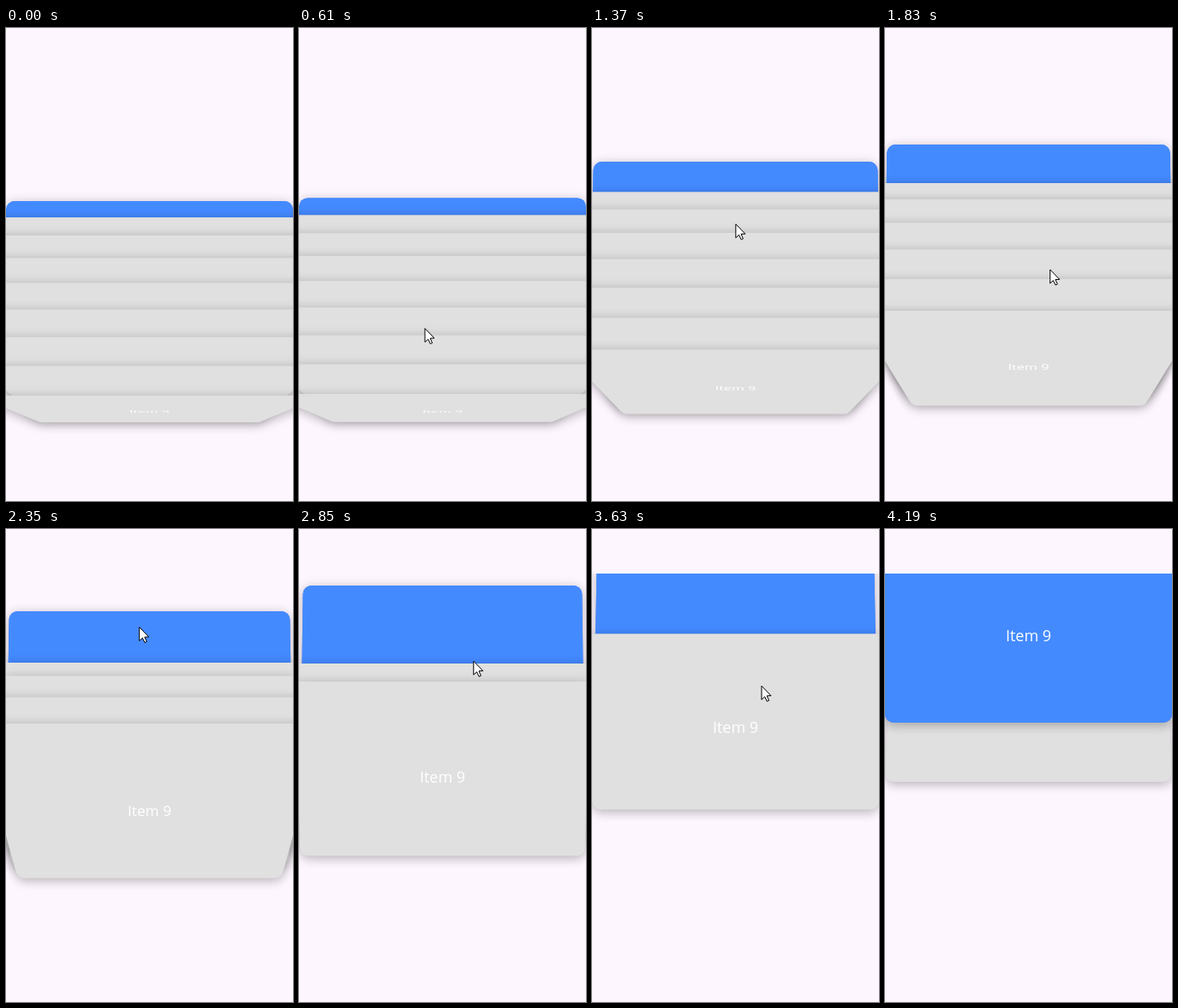
Write an HTML page with a canvas that moves like this. It is 335 by 552 pixels and loops after 5200 ms.

```html
<!DOCTYPE html>
<html lang="en">
<head>
<meta charset="utf-8">
<title>Card stack</title>
<style>
  html, body { margin: 0; height: 100%; overflow: hidden; background: #fdf6fe; }
  canvas { display: block; width: 335px; height: 552px; }
</style>
</head>
<body>
<canvas></canvas>
<script>
const W = 335, H = 552, LOOP = 5200, LIST_TOP = 52, LAST = 9, CARD_H = 205;
const STACK_BOTTOM = 429, STACK_TOP = 21, FLAT_BELOW = 174;
const BACK = '#fdf6fe', BLUE = '#448aff', GREY = '#e0e0e0';
const canvas = document.querySelector('canvas');
const ctx = canvas.getContext('2d');
const dpr = window.devicePixelRatio || 1;
canvas.width = W * dpr;
canvas.height = H * dpr;

// Scroll moves: start and end time, then the top edges they lead to
const MOVES = [
  { from: -1, to: 0, active: 202, first: 221, front: 429 },
  { from: 570, to: 890, active: 174, first: 201, front: 416 },
  { from: 1130, to: 1640, active: 136, first: 181, front: 330 },
  { from: 2130, to: 2350, active: 96, first: 156, front: 227 },
  { from: 2350, to: 2850, active: 66, first: 157, front: 178 },
  { from: 2850, to: 3630, active: 42, first: 123, front: 123 },
  { from: 3630, to: 3870, active: 21, first: 21, front: 21 }];

// Turning points of the pointer: time, x, y
const POINTER = [[230, 81, 427], [330, 148, 384], [570, 148, 384], [900, 144, 119], [1200, 190, 385],
  [1500, 152, 112], [2030, 218, 385], [2350, 156, 114], [2600, 195, 375], [2870, 205, 138],
  [3250, 190, 335], [3630, 198, 184], [3880, 318, 100], [4190, -12, 546]];

const clamp = v => Math.max(0, Math.min(1, v));
const mix = (a, b, f) => a + (b - a) * f;
const smooth = v => v * v * (3 - 2 * v);

const edge = (name, t) =>
  MOVES.reduce((v, m) => mix(v, m[name], clamp((t - m.from) / (m.to - m.from))), 0);

function pointerAt(t) {
  const i = POINTER.findIndex(key => key[0] > t);
  const [t0, x0, y0] = POINTER[i - 1], [t1, x1, y1] = POINTER[i];
  const f = (t - t0) / (t1 - t0);
  return [mix(x0, x1, f), mix(y0, y1, f)];
}

// Symmetric card: left inset x1 at the top, x2 at the bottom
function drawCard(top, bottom, x1, x2, color, rTop, rBottom) {
  const pts = [[x1, top, rTop], [W - x1, top, rTop], [W - x2, bottom, rBottom], [x2, bottom, rBottom]];
  const path = new Path2D();
  path.moveTo(W / 2, top);
  for (let i = 1; i <= 4; i++) {
    const [x, y, r] = pts[i % 4], next = pts[(i + 1) % 4];
    path.arcTo(x, y, next[0], next[1], r);
  }
  path.closePath();
  ctx.fillStyle = color;
  for (const [blur, dy, alpha] of [[14, 1, .14], [12, 4, .16]]) {
    ctx.shadowColor = `rgba(0,0,0,${alpha})`;
    ctx.shadowBlur = blur * dpr;
    ctx.shadowOffsetY = dy * dpr;
    ctx.fill(path);
  }
  ctx.shadowColor = 'transparent';
}

// The lower a card lies in the stack, the further its bottom edge tips away
function tiltedCard(top, color) {
  const angle = 1.37 * clamp((top - FLAT_BELOW) / (STACK_BOTTOM - FLAT_BELOW));
  const far = 1 / (1 + .32 * Math.sin(angle));
  const height = CARD_H * Math.cos(angle) * far;
  const overhang = 36 * Math.min(1, 4 * Math.sin(angle));
  drawCard(top, top + height, -overhang, W / 2 * (1 - far), color, 0, 10);
  return { height, far };
}

function drawCards(t) {
  const active = edge('active', t), first = edge('first', t), front = edge('front', t);
  const progress = (STACK_BOTTOM - front) / (STACK_BOTTOM - STACK_TOP);
  const selected = Math.round(1.4 + (LAST - 1) * smooth(progress));
  const gaps = Math.max(1, LAST - 1 - selected);
  const cardTop = i => mix(first, front, (1 - (LAST - i) / gaps) ** (1.18 + .4 * progress));

  if (selected === LAST) {
    drawCard(active + 70, active + 274, 8, 0, GREY, 10, 9);
  } else {
    const lean = .035 * (MOVES[0].active - active);
    drawCard(active, cardTop(selected + 1) + 12, lean, lean * .7, BLUE, 10, 0);
  }
  for (let i = selected + 1; i < LAST; i++) tiltedCard(cardTop(i), GREY);
  const { height, far } = tiltedCard(front, selected === LAST ? BLUE : GREY);

  ctx.save();
  ctx.translate(W / 2, front + height * (.5 + .0003 * (front - STACK_TOP)));
  ctx.scale((1 + far) / 2, height / CARD_H);
  ctx.font = '500 18px "Open Sans", "Noto Sans", sans-serif';
  ctx.textAlign = 'center';
  ctx.fillStyle = '#fff';
  ctx.fillText('Item 9', 0, 7);
  ctx.restore();
}

function drawPointer(x, y) {
  ctx.save();
  ctx.translate(x - .5, y - .5);
  ctx.beginPath();
  for (const [px, py] of [[0, 0], [0, 16], [3.7, 12.6], [6.3, 18], [8.6, 17], [6.2, 11.6], [11, 11.4]]) ctx.lineTo(px, py);
  ctx.closePath();
  ctx.fillStyle = '#fff';
  ctx.strokeStyle = '#000';
  ctx.fill();
  ctx.stroke();
  ctx.restore();
}

function draw(t) {
  ctx.setTransform(dpr, 0, 0, dpr, 0, 0);
  ctx.fillStyle = BACK;
  ctx.fillRect(0, 0, W, H);
  ctx.save();
  ctx.beginPath();
  ctx.rect(0, LIST_TOP, W, H - LIST_TOP);
  ctx.clip();
  drawCards(t);
  ctx.restore();
  if (t >= 230 && t < 4190) drawPointer(...pointerAt(t));
}

const start = performance.now();
function tick() {
  draw((performance.now() - start) % LOOP);
  requestAnimationFrame(tick);
}
tick();
</script>
</body>
</html>
```
